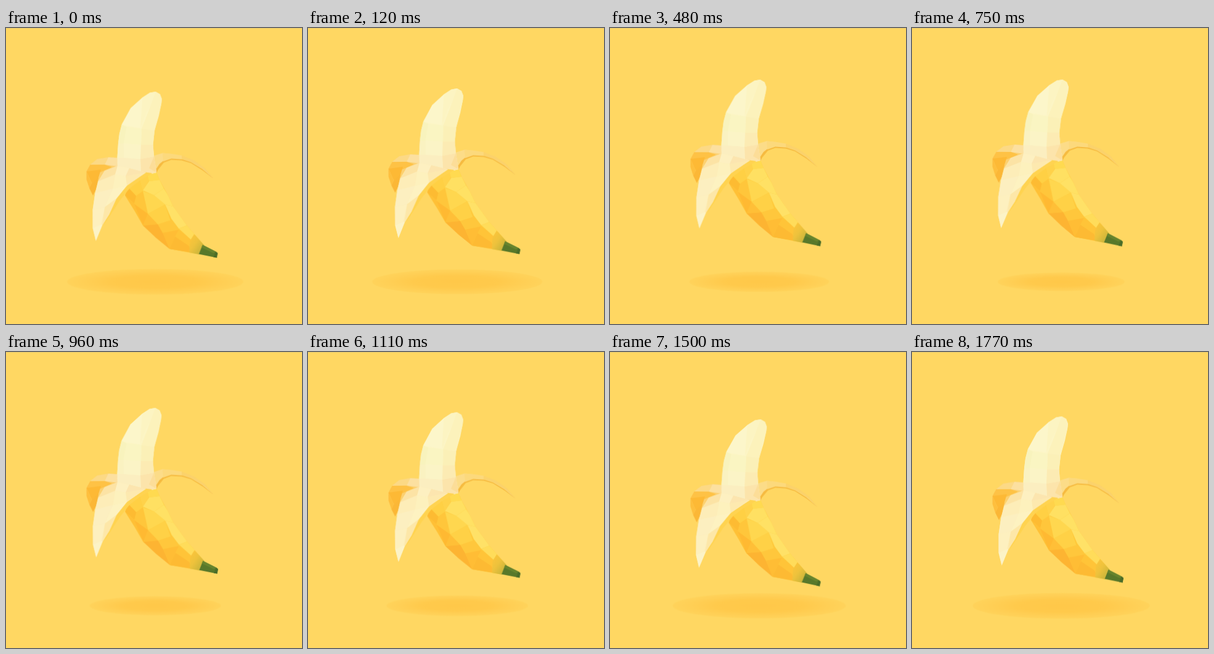
Write an HTML page without scripts that moves like this. It is 480 px wide and 480 px high and loops after 1.8 s.

```html
<!DOCTYPE html>
<html lang="en">
<head>
<meta charset="utf-8">
<title>Floating banana</title>
<style>
html, body { margin: 0; width: 100%; height: 100%; overflow: hidden; background: #ffd762; }
svg { display: block; width: 100%; height: 100%; }
.bob, .tilt, .shadow { animation: 900ms cubic-bezier(.37, 0, .63, 1) infinite alternate; }
.bob { animation-name: bob; animation-delay: -280ms; }
.tilt { animation-name: tilt; animation-duration: 450ms; animation-delay: -255ms; transform-origin: 240px 235px; }
.shadow { animation-name: shrink; animation-delay: -115ms; transform-origin: 242px 411.5px; }
@keyframes bob { from { transform: translateY(5.3px); } to { transform: translateY(-21.7px); } }
@keyframes tilt { from { transform: rotate(.65deg); } to { transform: rotate(-.65deg); } }
@keyframes shrink { to { transform: scale(.71); } }
</style>
</head>
<body>
<svg viewBox="0 0 480 480">
  <defs>
    <radialGradient id="soft">
      <stop offset="0" stop-color="#ffc849"/>
      <stop offset=".5" stop-color="#ffca4c"/>
      <stop offset=".78" stop-color="#ffcf55"/>
      <stop offset="1" stop-color="#ffd35b"/>
    </radialGradient>
    <linearGradient id="ripe" gradientUnits="userSpaceOnUse" x1="293" y1="342" x2="319" y2="361">
      <stop offset="0" stop-color="#fec53a"/>
      <stop offset=".5" stop-color="#eec23c"/>
      <stop offset="1" stop-color="#c8b43a"/>
    </linearGradient>
  </defs>

  <rect width="480" height="1" fill="#eccd70"/>
  <ellipse class="shadow" cx="242" cy="411.5" rx="144.500" ry="21" fill="url(#soft)"/>

  <g class="bob"><g class="tilt">
    <!-- back left peel -->
    <polygon fill="#fcd070" points="130.500,233 136.500,222 148,213 166,210 180,211 184,226 165,230 152,243 146,262 141,272 135,260 130.500,246"/>
    <polygon fill="#fcd985" points="136.500,222 148,213 166,210 160,222"/>
    <polygon fill="#fce0a0" points="166,210 180,211 182,225 160,222"/>
    <polygon fill="#fec245" points="130.500,233 136.500,222 160,222 172,226 154,234"/>
    <polygon fill="#fdb935" points="130.500,233 154,230 149,246 139,252"/>
    <polygon fill="#febf3d" points="130.500,233 139,252 135,260 130.500,246"/>
    <polygon fill="#fbb736" points="139,252 150,243 146,262 141,272 135,260"/>

    <!-- right peel -->
    <polygon fill="#f6bb40" points="241,224 254,208 285,208 305,216 322,228 336,245 319,232 300,220 285,215.500 268,214.500 256,219 247,230 243,237"/>
    <polygon fill="#fcdc88" points="239,208 254,203.500 268,205 259,213 249,221 243,230"/>
    <polygon fill="#fcd97c" points="254,203.500 270,205 285,207.500 290,214 268,212.500 255,217"/>
    <polygon fill="#fbd26b" points="285,207.500 305,215.500 322,227.500 336,245 318,229.500 300,218.500 285,213.500"/>

    <!-- lower body -->
    <polygon fill="#ffc83a" points="224,235 244,235 249,247 262,271 271,290 293,321 321,353 313,368 265,359 222,321 209,298 193,272 197,259 216,243"/>
    <polygon fill="#ffd24a" points="228,236 216,244 222,266 232,248"/>
    <polygon fill="#ffda50" points="228,235 244,235 249,247 232,249"/>
    <polygon fill="#ffe062" points="232,249 249,247 256,261 240,272 222,264"/>
    <polygon fill="#ffd044" points="216,244 222,265 211,273 198,259"/>
    <polygon fill="#fdbb32" points="198,259 211,273 208,285 193,272"/>
    <polygon fill="#ffc036" points="193,272 208,285 222,321 209,298"/>
    <polygon fill="#ffc63b" points="211,273 222,265 230,302 208,286"/>
    <polygon fill="#ffd74f" points="222,265 240,272 258,287 230,302"/>
    <polygon fill="#ffe164" points="256,261 262,271 271,290 258,287 240,272"/>
    <polygon fill="#ffb932" points="208,286 230,302 222,321"/>
    <polygon fill="#ffbf37" points="230,302 246,319 222,321"/>
    <polygon fill="#ffd146" points="230,302 258,287 268,318 246,319"/>
    <polygon fill="#ffe167" points="258,287 271,290 293,321 280,326 268,310"/>
    <polygon fill="#fdb432" points="222,321 246,319 254,333 265,359 243,341"/>
    <polygon fill="#ffc73c" points="246,319 268,312 280,328 254,333"/>
    <polygon fill="#ffbd35" points="254,333 280,328 274,339 265,359"/>
    <polygon fill="#ffc438" points="280,328 303,345 301,365 265,359 274,339"/>
    <polygon fill="#fdba33" points="274,339 296,354 301,365 265,359"/>
    <polygon fill="#ffdc5a" points="280,326 293,321 307,337 303,347"/>
    <polygon fill="url(#ripe)" points="305,335 321,353 313,368 297,365 298,346"/>

    <!-- stem -->
    <polygon fill="#58782a" points="318.500,352.500 340,363.500 343,366 341.500,373.500 312.500,367.500"/>
    <polygon fill="#67842d" points="318.500,352.500 340,363.500 336,366 317,357"/>
    <polygon fill="#4a6c28" points="340,363.500 343,366 341.500,373.500 336,372.500"/>

    <!-- fruit -->
    <polygon fill="#fcf5c5" points="181,226 180.500,211 182,188 184,172 188,156.500 202.500,130.500 221.500,113.500 234,105.500 243,104 250,108 253,116 252,124 248,143 241,167 238.500,190 240,209 244,235 236,237 218,234"/>
    <polygon fill="#fcf6ca" points="202.500,130.500 221.500,113.500 234,105.500 224,138 218,163 188,157.500"/>
    <polygon fill="#fcf4c2" points="221.500,113.500 234,105.500 243,104 241,114 227,139 218,163"/>
    <polygon fill="#fcf2bb" points="243,104 250,108 253,116 252,124 241,167 220,164 230,139"/>
    <polygon fill="#fbf0b7" points="220,164 241,167 238.500,190 219,190"/>
    <polygon fill="#f8f3bd" points="188,157 196,161 191,188 182,188 184,172"/>
    <polygon fill="#faf5c2" points="196,161 220,164 219,190 191,188"/>
    <polygon fill="#faf2c1" points="182,188 191,188 191,211 180.500,211"/>
    <polygon fill="#fbf4c6" points="191,188 219,190 218,213 191,211"/>
    <polygon fill="#fcebb3" points="219,190 238.500,190 240,209 218,213"/>
    <polygon fill="#fbeec0" points="180.500,211 191,211 218,213 219,234 181,226"/>
    <polygon fill="#fce4ab" points="218,213 240,209 244,235 236,237 219,234"/>
    <polygon fill="#fcdd98" points="240,209 244,235 232,228"/>

    <!-- front peel -->
    <polygon fill="#ffd350" points="222,234 237,236 228,242 217,248 200,261 184,281 169,304 158,320 178,273"/>
    <polygon fill="#fcecb4" points="181,224 200,228 227,235 218,241 196,256 179,277 167,303 156,320 145.500,345.500 140.500,325 140.500,295 144.500,268 149.500,249 160,232"/>
    <polygon fill="#fce3a5" points="160,232 181,224 177,238 149.500,249"/>
    <polygon fill="#fdf0c1" points="181,224 200,228 194,241 177,238"/>
    <polygon fill="#fce5af" points="200,228 227,235 194,241"/>
    <polygon fill="#fde9af" points="194,241 227,235 218,241 196,256"/>
    <polygon fill="#fdf1bd" points="177,238 194,241 196,256 173,261"/>
    <polygon fill="#fdedb8" points="149.500,249 177,238 173,261 144.500,268"/>
    <polygon fill="#fcefc0" points="144.500,268 173,261 160,291 140.500,295"/>
    <polygon fill="#fdf2c1" points="173,261 196,256 179,277 160,291"/>
    <polygon fill="#fde7a8" points="179,277 167,303 156,320 160,291"/>
    <polygon fill="#fdf0bf" points="140.500,295 160,291 154,319 140.500,325"/>
    <polygon fill="#fcf3c7" points="140.500,325 154,319 156,320 145.500,345.500"/>
  </g></g>
</svg>
</body>
</html>
```
